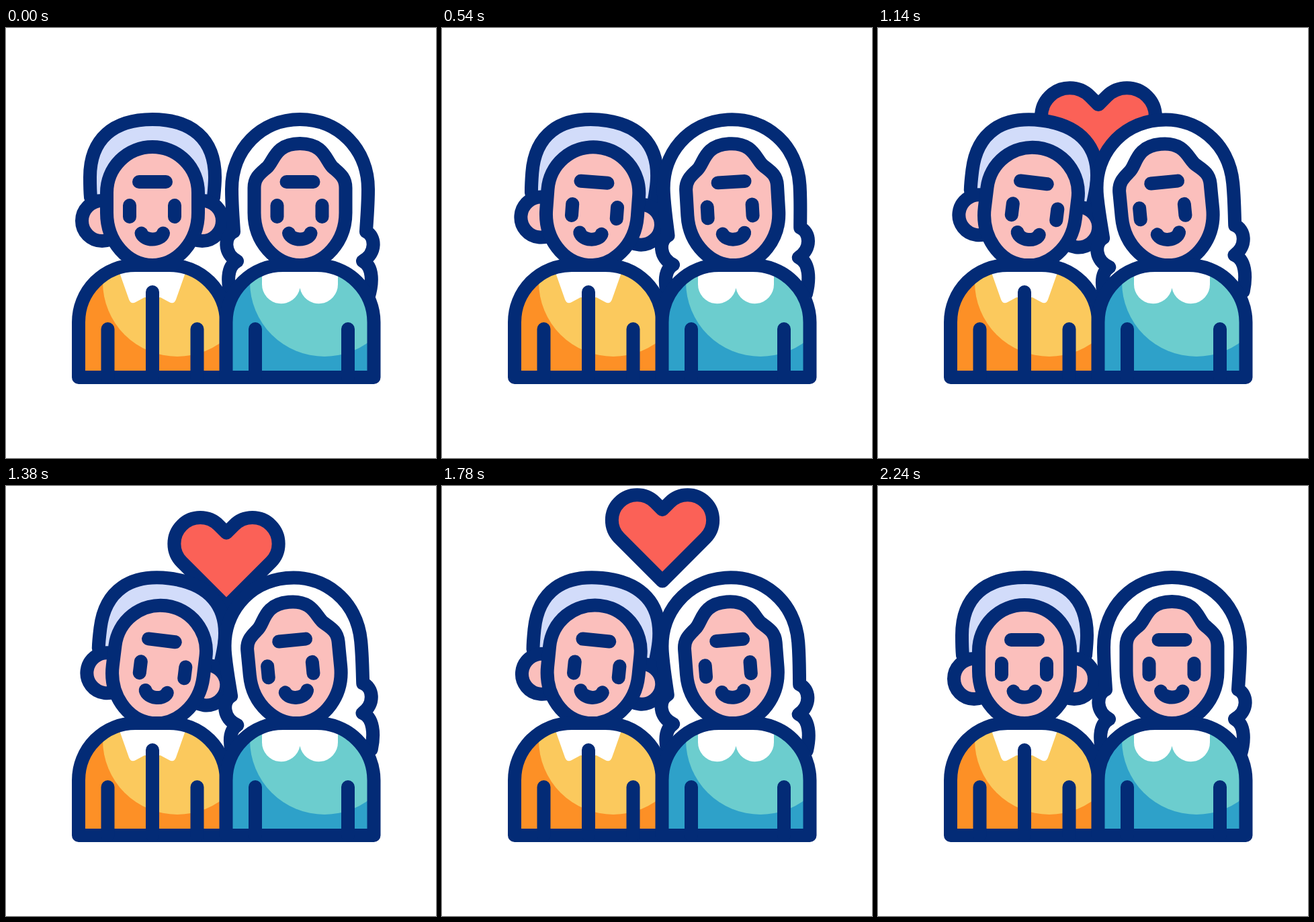
These frames come from a looping animation (640x640 px, 2.4 s). An HTML page:

```html
<!DOCTYPE html>
<html lang="en">
<head>
<meta charset="utf-8">
<title>Couple with heart</title>
<style>
  html, body { margin: 0; width: 100%; height: 100%; overflow: hidden; background: #fff; }
  svg { display: block; width: 100%; height: 100%; }

  .line, .shape {
    stroke: #032b76; stroke-width: 20;
    stroke-linecap: round; stroke-linejoin: round;
  }
  .line { fill: none; }
  .skin { fill: #fbbfbc; }

  .head, .eyes, .smile { animation: 2400ms cubic-bezier(.37, 0, .63, 1) infinite; }
  .head { animation-name: tilt; }
  .eyes, .smile { animation-name: glance; }
  .man { --tilt: 7deg; --look: 7px; transform-origin: 218px 343px; }
  .woman { --tilt: -5.5deg; --look: -6.5px; transform-origin: 437.5px 348px; }
  .eyes { --shift: var(--look); }
  .smile { --shift: calc(var(--look) * .2); }

  .heart {
    fill: #fb6157;
    vector-effect: non-scaling-stroke;
    animation: rise 2400ms infinite, swell 2400ms linear infinite;
  }

  @keyframes tilt {
    0%, 8.333% { rotate: 0deg; }
    33.333%, 66.667% { rotate: var(--tilt); }
    93.333%, 100% { rotate: 0deg; }
  }
  @keyframes glance {
    0%, 8.333% { translate: 0 0; }
    33.333%, 66.667% { translate: var(--shift) 0; }
    93.333%, 100% { translate: 0 0; }
  }
  @keyframes rise {
    0%, 32% { translate: 328px 445px; animation-timing-function: cubic-bezier(.215, .61, .355, 1); }
    67.5% { translate: 328px 100px; animation-timing-function: cubic-bezier(.333, 0, .667, .333); }
    85.833%, 100% { translate: 328px -88px; }
  }
  @keyframes swell {
    0%, 32% { scale: .9; }
    42%, 47.5% { scale: 1.18; }
    53.333% { scale: 1.11; }
    67.5% { scale: 1; }
    80% { scale: 1.08; }
    85.833%, 100% { scale: 1.12; }
  }
</style>
</head>
<body>
<svg viewBox="0 0 640 640">
  <defs>
    <path id="torso" d="M108 520V438A85 85 0 0 1 193 353H243A85 85 0 0 1 328 438V520Z"/>
    <clipPath id="inside"><use href="#torso"/></clipPath>
    <path id="eyes" class="line" d="M184 264V281M251 264V281"/>
    <path id="brow" class="line" d="M198 229H238"/>
    <path id="smile" class="line" d="M201.5 305.500C206 317.500 230 317.500 234 305.500"/>
  </defs>

  <path class="shape heart" d="M0 64L-61.500 2.500A36 36 0 0 1 -10.500 -48.500L0 -38L10.500 -48.500A36 36 0 0 1 61.500 2.500Z"/>

  <g class="head man">
    <path class="shape" fill="#d2dcfa" d="M126 252C125 242 125 232 125 222C125 165 160 136 218 136S311 165 311 222C311 232 310 242 309 252"/>
    <circle class="shape skin" cx="143" cy="287" r="30"/>
    <circle class="shape skin" cx="292" cy="287" r="30"/>
    <path class="shape skin" d="M150 245A68 68 0 0 1 286 245V275C286 318 255 353 218 353S150 318 150 275Z"/>
    <use href="#brow"/>
    <g class="eyes"><use href="#eyes"/></g>
    <g class="smile"><use href="#smile"/></g>
  </g>

  <g class="head woman">
    <path class="shape" fill="#fff" d="M336 402C329 380 328 355 344 347C323 335 325 310 339 303C338 285 336 265 336 240C336 180 380 136 437.500 136S539 180 539 240C539 265 537 285 536 303C550 310 552 335 531 347C547 355 546 380 539 402"/>
    <path class="shape skin" d="M369.500 275V238C369.500 222 379 216 388 208C399 199 400 172 437.500 172S476 199 487 208C496 216 505.500 222 505.500 238V275C505.500 318 474 353 437.500 353S369.500 318 369.500 275Z"/>
    <g transform="translate(219.500)">
      <use href="#brow"/>
      <g class="eyes"><use href="#eyes"/></g>
      <g class="smile"><use href="#smile"/></g>
    </g>
  </g>

  <g>
    <g clip-path="url(#inside)">
      <use href="#torso" fill="#fd9026"/>
      <circle cx="255" cy="378" r="111" fill="#fbc95d"/>
      <path fill="#fff" d="M167.500 360L183 404Q186 412 193 408L206 401H230L243 408Q250 412 253 404L268.500 360Z"/>
    </g>
    <use href="#torso" class="line"/>
    <path class="line" d="M151.500 448V520M218 393V520M284.500 448V520"/>
  </g>

  <g transform="translate(219.500)">
    <g clip-path="url(#inside)">
      <use href="#torso" fill="#2ea1c9"/>
      <circle cx="254.500" cy="378" r="111" fill="#6ccdce"/>
      <path fill="#fff" d="M161.500 360V381.500A28.500 28.500 0 0 0 218 387A28.500 28.500 0 0 0 274.500 381.500V360Z"/>
    </g>
    <use href="#torso" class="line"/>
    <path class="line" d="M151.500 448V520M289.500 448V520"/>
  </g>
</svg>
</body>
</html>
```
